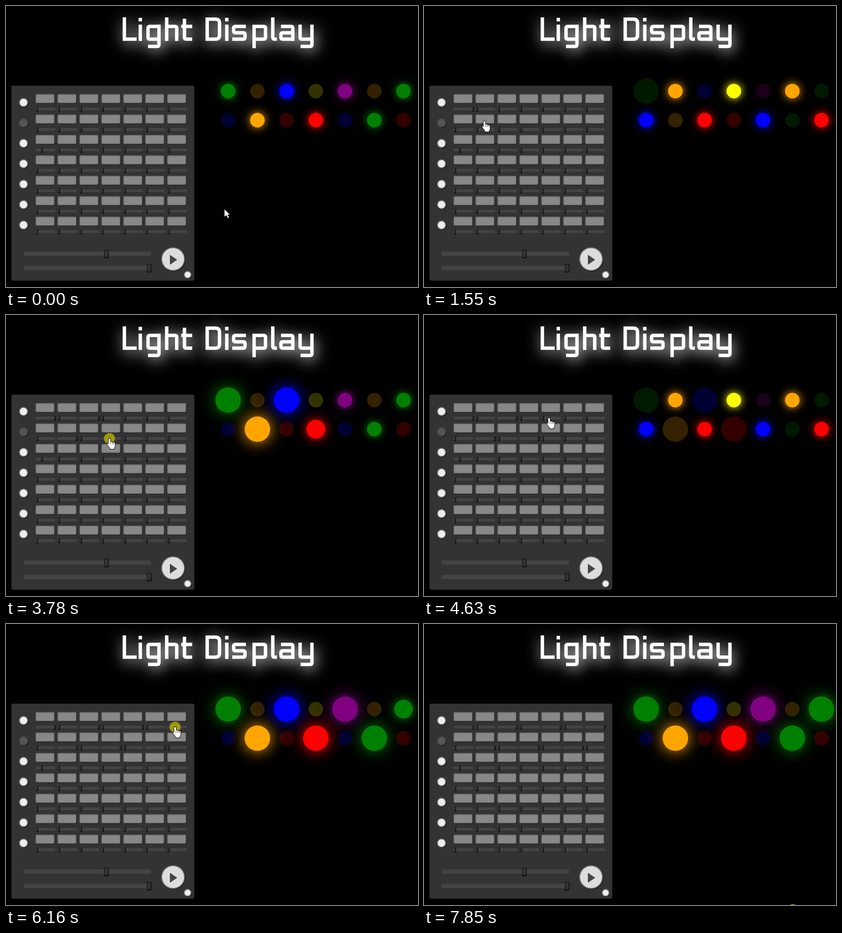
An HTML page with a canvas that plays this animation: 905x619 px, repeating every 7.93 s.

```html
<!DOCTYPE html>
<html lang="en">
<head>
<meta charset="utf-8">
<title>Light Display</title>
<style>
  html, body { margin: 0; width: 100%; height: 100%; overflow: hidden; background: #000; }
  h1 { position: absolute; left: 256px; top: 16px; margin: 0; color: transparent; font: 64px/1.1 "DejaVu Sans", sans-serif; white-space: nowrap; }
  canvas { position: absolute; left: 0; top: 0; display: block; }
</style>
</head>
<body>
<h1>Light Display</h1>
<canvas id="stage" width="905" height="619"></canvas>
<script>
const ctx = document.getElementById('stage').getContext('2d');
const LOOP = 7930, STEP = 76.92, BLINK = 298, DRAG = 300, TRAVEL = 39;

const lights = [
  ['green', 'orange', 'blue', 'yellow', 'purple', 'orange', 'green'],
  ['blue', 'orange', 'red', 'red', 'blue', 'green', 'red']
];
const starts = [1000, 1860, 2780, 3770, 4630, 5310, 6160];
const thumbX = c => 68 + 48.2 * c;
const sliderY = r => 227 + 45 * r;

// Cursor path: time, x, y
const path = [[0, 480, 448], [70, 480, 448]];
starts.forEach((s, c) => {
  const x = thumbX(c), y = sliderY(c % 2);
  path.push([s - 150, x + 14, y], [s, x + 14, y], [s + DRAG, x + TRAVEL, y]);
});
path.push([1550, 133, 254], [2550, 174, 254], [6780, 490, 289],
  [6940, 520, 386], [7550, 810, 629], [LOOP, 810, 629]);
path.sort((a, b) => a[0] - b[0]);

const lettering = new Path2D(
  'M260 25V73H287 M295 41V77 M295 26V34' +
  'M336 41V85Q336 89 332 89H312 M336 45H316Q312 45 312 49V69Q312 73 316 73H336' +
  'M353 25V77 M353 45H371Q375 45 375 49V77' +
  'M392 28V69Q392 73 396 73H409 M385 45H409' +
  'M442 29H460Q469 29 469 38V64Q469 73 460 73H442Z' +
  'M485 41V77 M485 26V34' +
  'M527 45H504Q500 45 500 49V55Q500 59 504 59H521Q525 59 525 63V69Q525 73 521 73H497' +
  'M545 93V45H566Q570 45 570 49V69Q570 73 566 73H545' +
  'M586 25V69Q586 73 590 73H595' +
  'M604 45H626Q630 45 630 49V77 M630 73H608Q604 73 604 69V63Q604 59 608 59H630' +
  'M646 41V69Q646 73 650 73H672 M672 41V85Q672 89 668 89H647');
const arrow = new Path2D('M0 0V16L4 12.5L7 19L9.5 18L6.7 11.5H11.5Z');
const hand = new Path2D('M-2 1Q0 -1 2 1V8Q4 6 6 8Q8 7 9 9Q12 8 12 12V16Q12 19 10 21V23H1V21L-5 13Q-5 10 -2 12Z');

function rect(x, y, w, h, radius, color) {
  ctx.fillStyle = color;
  ctx.beginPath();
  ctx.roundRect(x, y, w, h, radius);
  ctx.fill();
}

function disc(x, y, radius, color) {
  ctx.fillStyle = color;
  ctx.beginPath();
  ctx.arc(x, y, radius, 0, 2 * Math.PI);
  ctx.fill();
}

function roundButton(x, y, radius, color, edge) {
  disc(x + 1, y + 1, radius, '#111');
  disc(x, y, radius, edge);
  disc(x, y, radius - 2, color);
}

function drawTitle() {
  ctx.save();
  ctx.strokeStyle = '#fff';
  ctx.lineWidth = 7.5;
  ctx.shadowColor = '#fff';
  ctx.shadowBlur = 32;
  ctx.shadowOffsetX = 3;
  ctx.shadowOffsetY = 6;
  ctx.stroke(lettering);
  ctx.restore();
}

function drawPanel(values) {
  rect(12, 175.5, 401.5, 429.5, 4, '#333');
  for (let r = 0; r < 7; r++) {
    const dim = r === 1;
    roundButton(38.5, 212.5 + 45 * r, 10, dim ? '#555' : '#eee', dim ? '#4a4a4a' : '#777');
    for (let c = 0; c < 7; c++) {
      const x = 65 + 48.2 * c, y = 194 + 45 * r;
      rect(x + 1, y + 1, 41.5, 20, 3, '#1c1c1c');
      rect(x, y, 41.5, 20, 3, '#6e6e6e');
      rect(x + 1.5, y + 2, 38.5, 16.5, 2, '#888');
      rect(x, sliderY(r) - 3, 43, 6, 0, '#444');
      const value = r === c % 2 ? values[c] : r === 2 && c === 0 ? 0.26 : 0;
      const tx = thumbX(c) + value * TRAVEL;
      rect(tx - 2, sliderY(r) - 5, 4.5, 11, 1, '#0a0a0a');
      rect(tx - 2, sliderY(r) - 5, 3, 9.5, 1, '#333');
    }
  }
  for (const [x, y] of [[220.5, 545.5], [314.5, 577]]) {
    rect(39, y - 4.5, 279.5, 9, 0, '#444');
    rect(x - 5, y - 9, 10, 19, 2, '#0a0a0a');
    rect(x - 4, y - 8, 7.5, 16, 2, '#333');
  }
  roundButton(367, 557.5, 26, '#ddd', '#777');
  ctx.fillStyle = '#444';
  ctx.fill(new Path2D('M360 548L376 559L360 570Z'));
  roundButton(399, 592, 8.5, '#eee', '#777');
}

function drawLights(values, phase) {
  lights.forEach((row, r) => row.forEach((color, c) => {
    const main = r === c % 2;
    const lit = main === (phase === 1);
    const radius = 16 + (main ? 12 * values[c] : 0);
    ctx.save();
    if (lit) {
      ctx.shadowColor = color;
      ctx.shadowBlur = 1.2 * radius;
    } else {
      ctx.globalAlpha = 0.2;
    }
    disc(488 + 64.2 * c, 187.5 + 64 * r, radius, color);
    ctx.restore();
  }));
}

function cursorAt(t) {
  const i = Math.max(1, path.findIndex(p => p[0] > t));
  const [t0, x0, y0] = path[i - 1], [t1, x1, y1] = path[i];
  const k = (t - t0) / (t1 - t0);
  return [x0 + (x1 - x0) * k, y0 + (y1 - y0) * k];
}

function drawCursor(x, y, pressed) {
  if (pressed) disc(x, y, 12, 'rgba(195,185,0,.75)');
  ctx.save();
  ctx.translate(x, y);
  const shape = x < 400 && y < 505 ? hand : arrow;
  ctx.strokeStyle = '#000';
  ctx.lineWidth = 2;
  ctx.stroke(shape);
  ctx.fillStyle = '#fff';
  ctx.fill(shape);
  if (shape === hand) {
    ctx.lineWidth = 0.8;
    ctx.stroke(new Path2D('M2 8V13 M6 8V13 M9 9V13'));
  }
  ctx.restore();
}

function draw(now) {
  const t = Math.min(LOOP - 1, Math.floor((now % LOOP + 10) / STEP) * STEP + 10);
  const [x, y] = cursorAt(t);
  const values = starts.map((s, c) =>
    t < s ? 0 : t >= s + DRAG ? 1 : (x - thumbX(c)) / TRAVEL);
  const pressed = t > 7790 || starts.some(s => t >= s && t < s + DRAG);
  const phase = Math.abs(Math.floor((t - 212) / BLINK)) % 2;

  ctx.fillStyle = '#000';
  ctx.fillRect(0, 0, 905, 619);
  drawTitle();
  drawPanel(values);
  drawLights(values, phase);
  drawCursor(x, y, pressed);
}

const begin = performance.now();
function tick() {
  draw(performance.now() - begin);
  requestAnimationFrame(tick);
}
tick();
</script>
</body>
</html>
```
